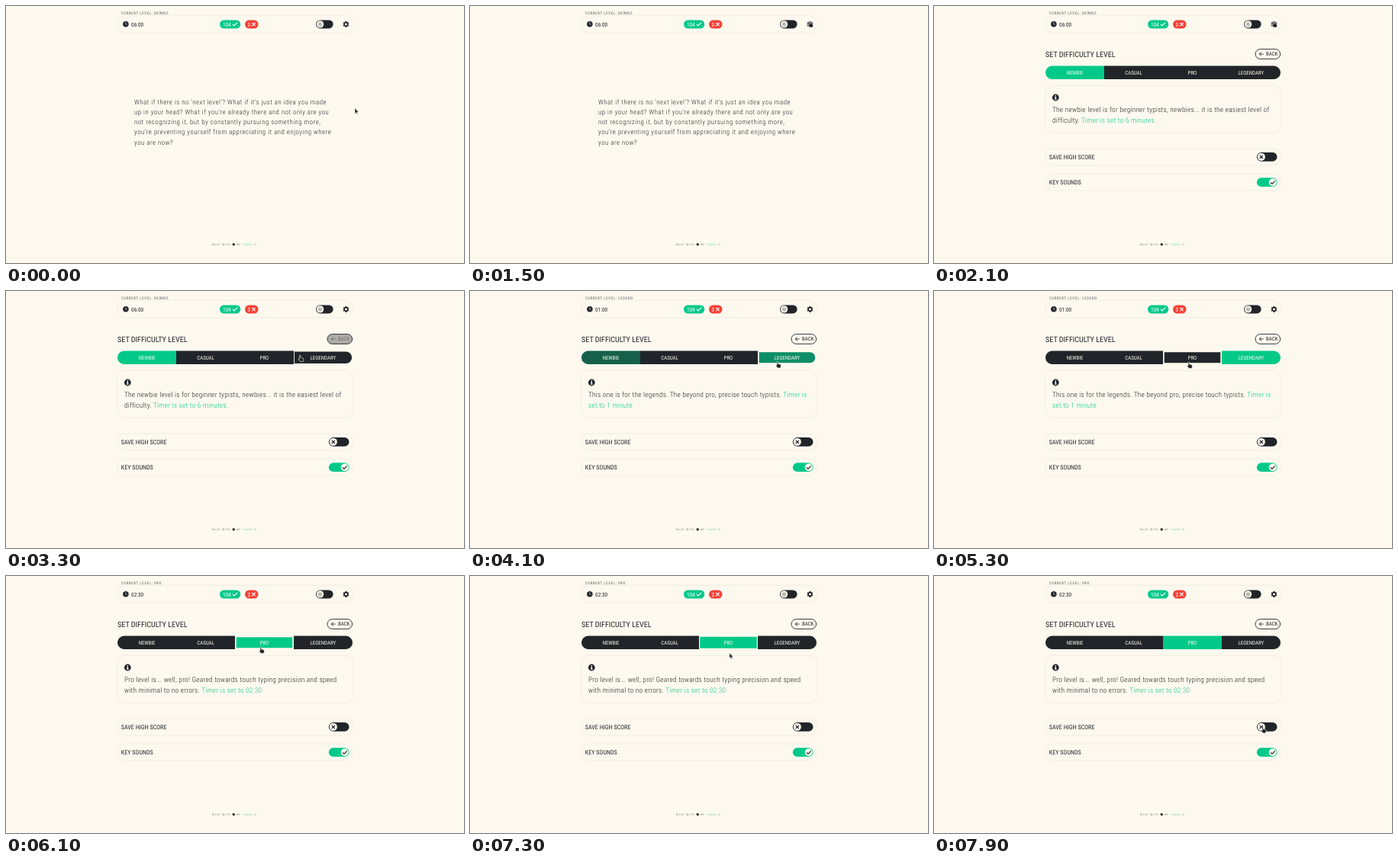
An HTML page for the animation above (8000 ms loop, 600 by 337 pixels).

```html
<!DOCTYPE html>
<html lang="en">
<head>
<meta charset="utf-8">
<title>Typing test settings</title>
<style>
  :root { --k: 1; --bg: #fef9ef; --ink: #212529; --green: #03c988; --red: #f44336; }
  html, body { margin: 0; width: 100%; height: 100%; overflow: hidden; background: var(--bg); }
  svg { display: block; width: 100vw; height: 100vh; }
  text {
    font-family: "Roboto Condensed", Roboto, sans-serif; font-stretch: 75%;
    text-rendering: geometricPrecision; fill: var(--ink);
  }
  .level { font-size: 5px; letter-spacing: calc(.55px / var(--k)); fill: #5d6066; }
  .num { font-size: 7.3px; }
  .badge { fill: #fff; }
  .quote { font-size: 8.75px; font-weight: 300; letter-spacing: calc(.54px / var(--k)); }
  .title { font-size: 10.15px; }
  .btn { font-size: 6.9px; }
  .mid { text-anchor: middle; fill: var(--bg); }
  .info { font-size: 9.375px; font-weight: 300; letter-spacing: calc(.235px / var(--k)); }
  .label { font-size: 8.1px; }
  .foot { font-size: 3.6px; font-weight: 300; letter-spacing: calc(.82px / var(--k)); }
  .hi { fill: var(--green); }
  .card { fill: var(--bg); filter: drop-shadow(0 0 1.1px rgba(0, 0, 0, .11)); }
  .ink { fill: var(--ink); }
  .paper { fill: var(--bg); }
  .red { fill: var(--red); }
  .line { fill: none; stroke: var(--ink); stroke-width: 1.2; }
  .light { stroke: #fff; }
</style>
</head>
<body>
<svg viewBox="0 0 600 337" preserveAspectRatio="none">
  <!-- status bar -->
  <text class="level" x="150.8" y="10.7">CURRENT LEVEL: <tspan id="level"></tspan></text>
  <rect class="card" x="146.5" y="12.8" width="307" height="21.8" rx="10.9"/>
  <circle class="ink" cx="156.9" cy="23.8" r="3.75"/>
  <path class="line" style="stroke:var(--bg);stroke-width:.7" d="M156.9 21.4v2.5l1.5 1.1"/>
  <text class="num" id="time" x="164.1" y="26.5"></text>
  <rect class="hi" x="280" y="18.4" width="27.2" height="11.1" rx="5.5"/>
  <text class="num badge" x="283.9" y="26.5">104</text>
  <path class="line light" d="M297 24l2 2 4-4.2"/>
  <rect class="red" x="313" y="18.4" width="17.5" height="11.1" rx="5.5"/>
  <text class="num badge" x="316.4" y="26.5">3</text>
  <path class="line light" d="M322.4 21.9l4.2 4.2m0-4.2l-4.2 4.2"/>
  <rect class="ink" x="406" y="18.5" width="22.6" height="10.9" rx="5.45"/>
  <g transform="translate(411.5 23.9)">
    <circle class="paper" r="4.7"/>
    <circle class="line" r="1.4" style="stroke-width:.5"/>
    <circle class="line" r="2.6" pathLength="16" stroke-dasharray=".6 1.4" style="stroke-width:.9"/>
  </g>
  <g transform="translate(445.4 23.9) rotate(-108)">
    <circle class="line" r="2.3" style="stroke-width:1.7"/>
    <circle class="line" r="3.5" pathLength="12" stroke-dasharray="1.2 .8" style="stroke-width:1"/>
  </g>

  <text class="quote" id="quote" x="168" y="129.1">
    <tspan x="168">What if there is no 'next level'? What if it's just an idea you made</tspan>
    <tspan x="168" dy="13.125">up in your head? What if you're already there and not only are you</tspan>
    <tspan x="168" dy="13.125">not recognizing it, but by constantly pursuing something more,</tspan>
    <tspan x="168" dy="13.125">you're preventing yourself from appreciating it and enjoying where</tspan>
    <tspan x="168" dy="13.125">you are now?</tspan>
  </text>

  <g id="settings">
    <text class="title" x="146" y="66.7">SET DIFFICULTY LEVEL</text>
    <rect id="back" class="line" x="421" y="56.6" width="32.6" height="12.8" rx="6.4" style="stroke-width:.9"/>
    <path id="arrow" class="line" style="stroke-width:.9" d="M431.6 63h-5.4m2.5-2.5l-2.5 2.5 2.5 2.5"/>
    <text class="btn" id="backText" x="435" y="65.4">BACK</text>
    <g id="tabs"></g>

    <rect class="card" x="146.3" y="104.8" width="307.4" height="61" rx="9"/>
    <circle class="ink" cx="159.3" cy="120" r="4.4"/>
    <path class="paper" d="M158.6 117h1.5v1.4h-1.5zM158 119.2h2.1v2.6h.7v1h-2.8v-1h.7v-1.6h-.7z"/>
    <text class="info" id="info" x="155" y="139.3"></text>

    <rect class="card" x="146.3" y="187.6" width="307.4" height="20.8" rx="10.4"/>
    <text class="label" x="150.8" y="200.8">SAVE HIGH SCORE</text>
    <rect class="ink" x="422.9" y="192" width="26.6" height="11.8" rx="5.9"/>
    <circle class="paper" cx="428.8" cy="197.9" r="5"/>
    <path class="line" d="M426.7 195.8l4.2 4.2m0-4.2l-4.2 4.2"/>

    <rect class="card" x="146.3" y="220.8" width="307.4" height="20.8" rx="10.4"/>
    <text class="label" x="150.8" y="234.1">KEY SOUNDS</text>
    <rect class="hi" x="422.9" y="225.3" width="26.6" height="11.8" rx="5.9"/>
    <circle class="paper" cx="443.7" cy="231.2" r="5"/>
    <path class="line" d="M440.9 231.3l2 2 3.8-4"/>
  </g>

  <text class="foot" x="269.8" y="314.3">BUILT WITH</text>
  <path class="ink" d="M298.3 314.7l-1.6-1.7c-.8-1.1.6-2.3 1.6-1.2 1-1.1 2.4.1 1.6 1.2z"/>
  <text class="foot" x="302.4" y="314.3">BY</text>
  <text class="foot hi" x="309.8" y="314.3">TAMELLO</text>

  <g id="cursor">
    <path id="pointer" fill="#222" stroke="#fff" stroke-width=".4" d="M0 0V6.9L1.6 5.5 2.7 8 3.8 7.5 2.7 5.1H4.8Z"/>
    <path id="hand" transform="translate(-2.7 0)" fill="#222" stroke="#fff" stroke-width=".6"
      d="M1.9.9a.8.8 0 0 1 1.6 0V3.4c.5-.3 1.1-.2 1.3.2.5-.2 1 0 1.2.4.8-.1 1.2.3 1.2 1V6.6L6.6 8.6H2.8L.6 5.6c-.3-.6.4-1.1.9-.7l.4.4Z"/>
  </g>
</svg>
<script>
const $ = id => document.getElementById(id);
const LOOP = 8000, STEP = 100;
const BG = [254, 249, 239], INK = [33, 37, 41], GREEN = [3, 201, 136];
const OPEN = 2000, PICK_LEGEND = 3980, PICK_PRO = 5700;

const TABS = ['NEWBIE', 'CASUAL', 'PRO', 'LEGENDARY'];
const hi = s => `<tspan class="hi">${s}</tspan>`;
const br = s => `<tspan x="155" dy="14.06">${s}</tspan>`;
const LEVELS = {
  newbie: ['NEWBIE', '06:00', 'The newbie level is for beginner typists, newbies... it is the easiest level of' +
    br('difficulty. ' + hi('Timer is set to 6 minutes.'))],
  legend: ['LEGEND', '01:00', 'This one is for the legends. The beyond pro, precise touch typists. ' +
    hi('Timer is') + br(hi('set to 1 minute'))],
  pro: ['PRO', '02:30', 'Pro level is... well, pro! Geared towards touch typing precision and speed' +
    br('with minimal to no errors. ' + hi('Timer is set to 02:30'))],
};

// Cursor hot spot: time, x, y
const PATH = [
  [0, 457, 134], [100, 456, 140], [200, 440, 124], [300, 411, 95], [400, 391, 72], [500, 398, 62], [600, 407, 58.5],
  [800, 407, 58.5], [900, 412, 56], [1200, 448, 26], [1500, 445, 19.5],
  [2500, 445, 19.5], [2700, 452, 46], [3000, 444, 64],
  [3100, 444, 64], [3200, 424, 73], [3300, 385.2, 84], [3700, 402.8, 92.3],
  [4600, 402.8, 92.3], [4900, 341, 93], [5000, 334, 93.4], [5200, 334, 93.4], [5300, 333.8, 92.8],
  [7200, 333.8, 92.8], [7300, 340, 101], [7600, 415, 184], [7900, 430.7, 197.4], [8000, 430.7, 197.4],
];

// Shapes that show the hand: x, y, width, height
const TARGETS = [[441, 19, 9, 10], [421, 56, 33, 14], [146, 78, 308, 18], [423, 192, 27, 12]];

const ramp = (t, from, span = 300) => {
  const x = Math.min(1, Math.max(0, (t - from) / span));
  return 1 - (1 - x) ** 2;
};
const pulse = (t, on, off) => ramp(t, on) - ramp(t, off);
const mix = (a, b, k) => `rgb(${a.map((v, i) => v + (b[i] - v) * k)})`;

function cursorAt(t) {
  const i = PATH.findIndex(p => p[0] > t);
  const [t0, x0, y0] = PATH[i - 1], [t1, x1, y1] = PATH[i];
  const k = (t - t0) / (t1 - t0);
  return [x0 + (x1 - x0) * k, y0 + (y1 - y0) * k];
}

function tabPath(i, inset) {
  const x = 146 + 77 * i + inset, y = 78.6 + inset, w = 77 - 2 * inset, h = 17.3 - 2 * inset;
  const l = i === 0 ? h / 2 : 0, r = i === 3 ? h / 2 : 0;
  return `M${x + l} ${y}H${x + w - r}a${r} ${r} 0 0 1 0 ${h}H${x + l}a${l} ${l} 0 0 1 0 ${-h}z`;
}

$('tabs').innerHTML = TABS.map((name, i) =>
  `<path/><text class="btn mid" x="${184.6 + 76.9 * i}" y="89.7">${name}</text>`).join('');
const tabShapes = [...$('tabs').querySelectorAll('path')];

// Without a condensed face, narrow all text by one common ratio
function condense() {
  const probe = document.querySelector('.title'), narrow = probe.getComputedTextLength();
  probe.style.cssText = 'font-family:Roboto,sans-serif;font-stretch:100%';
  const wide = probe.getComputedTextLength();
  probe.style.cssText = '';
  if (narrow < wide * .95) return;
  const k = .875;
  document.documentElement.style.setProperty('--k', k);
  for (const el of document.querySelectorAll('text'))
    el.setAttribute('transform', `matrix(${k} 0 0 1 ${el.getAttribute('x') * (1 - k)} 0)`);
}

let shown;
function showLevel(key) {
  if (key === shown) return;
  shown = key;
  const [name, time, info] = LEVELS[key];
  $('level').textContent = name;
  $('time').textContent = time;
  $('info').innerHTML = info;
}

function draw(t) {
  const open = t >= OPEN;
  $('quote').style.display = open ? 'none' : '';
  $('settings').style.display = open ? '' : 'none';
  $('settings').style.opacity = ramp(t, OPEN - 50, 150);
  showLevel(t < PICK_LEGEND ? 'newbie' : t < PICK_PRO ? 'legend' : 'pro');

  const back = pulse(t, 2780, 3180);
  $('back').style.fill = mix(BG, INK, back);
  $('backText').style.fill = $('arrow').style.stroke = mix(INK, BG, back);

  const active = [1 - ramp(t, PICK_LEGEND), 0, ramp(t, PICK_PRO), pulse(t, PICK_LEGEND, PICK_PRO)];
  const hover = [0, 0, pulse(t, 4750, 7250), pulse(t, 3210, 4650)];
  tabShapes.forEach((el, i) => {
    el.setAttribute('d', tabPath(i, 1.7 * hover[i]));
    el.setAttribute('fill', mix(INK, GREEN, active[i]));
  });

  const [x, y] = cursorAt(t);
  const over = TARGETS.some(([l, top, w, h], i) =>
    (open || i === 0) && x >= l && x <= l + w && y >= top && y <= top + h);
  $('cursor').setAttribute('transform', `translate(${x} ${y})`);
  $('hand').style.display = over ? '' : 'none';
  $('pointer').style.display = over ? 'none' : '';
}

condense();
const start = performance.now();
function tick() {
  const t = (performance.now() - start) % LOOP;
  draw(Math.floor(t / STEP) * STEP);
  requestAnimationFrame(tick);
}
tick();
</script>
</body>
</html>
```
